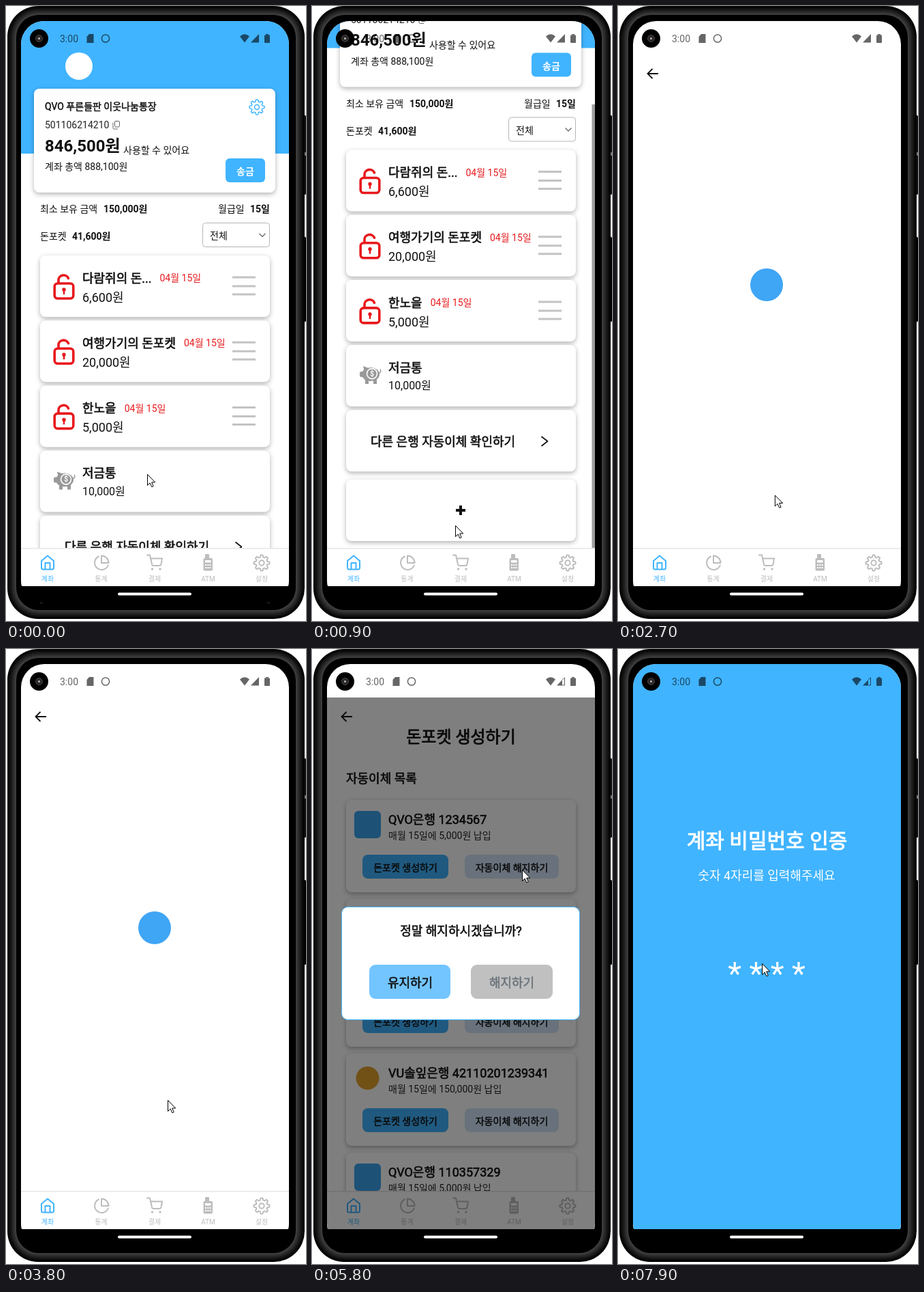
Animation, 440 px wide and 900 px high, one loop 8000 ms. Source, as an HTML page with a canvas:

```html
<!DOCTYPE html>
<html lang="ko">
<head>
<meta charset="utf-8">
<title>은행 앱</title>
<style>
html, body { margin: 0; width: 100%; height: 100%; overflow: hidden; background: #fff; }
canvas { display: block; width: 440px; height: 900px; }
</style>
</head>
<body>
<canvas id="stage" width="440" height="900"></canvas>
<script>
const c = document.getElementById('stage').getContext('2d');
const LOOP = 8000, STEP = 100;
const BLUE = '#40b4ff', INK = '#111', RED = '#e8191c', MUTE = '#bdbdbd';
const FONT = 'Roboto, "Noto Sans CJK KR", "Noto Sans CJK", sans-serif';
const BANK = 'QVO은행';

// keyframes: [time, value]; eased between neighbours
function track(t, keys) {
  if (t <= keys[0][0]) return keys[0][1];
  for (let i = 1; i < keys.length; i++) {
    const [t1, b] = keys[i], [t0, a] = keys[i - 1];
    if (t < t1) {
      const p = (t - t0) / (t1 - t0);
      return a + (b - a) * p * p * (3 - 2 * p);
    }
  }
  return keys[keys.length - 1][1];
}

// weight 500 is the regular face thickened by a thin outline
function text(s, x, y, size, color = INK, weight = 400, align = 'left') {
  const medium = weight === 500;
  c.font = `${medium ? 400 : weight} ${size}px ${FONT}`;
  c.textAlign = align;
  c.fillStyle = color;
  c.fillText(s, x, y + size * 0.37);
  if (medium) {
    c.strokeStyle = color;
    c.lineWidth = size * 0.034;
    c.lineJoin = 'round';
    c.strokeText(s, x, y + size * 0.37);
  }
  return c.measureText(s).width;
}

function box(x, y, w, h, r, fill, stroke, lw = 1) {
  c.beginPath();
  c.roundRect(x, y, w, h, r);
  if (fill) { c.fillStyle = fill; c.fill(); }
  if (stroke) { c.strokeStyle = stroke; c.lineWidth = lw; c.stroke(); }
}

function card(x, y, w, h, r = 8) {
  c.save();
  c.shadowColor = 'rgba(0,0,0,.3)';
  c.shadowBlur = 7;
  c.shadowOffsetY = 2.5;
  box(x, y, w, h, r, '#fff');
  c.restore();
}

function line(color, lw, ...pts) {
  c.beginPath();
  for (let i = 0; i < pts.length; i += 2) c.lineTo(pts[i], pts[i + 1]);
  c.strokeStyle = color;
  c.lineWidth = lw;
  c.stroke();
}

function poly(fill, ...pts) {
  c.beginPath();
  for (let i = 0; i < pts.length; i += 2) c.lineTo(pts[i], pts[i + 1]);
  c.closePath();
  c.fillStyle = fill;
  c.fill();
}

function disc(x, y, r, fill, stroke, lw = 1) {
  c.beginPath();
  c.arc(x, y, r, 0, 7);
  if (fill) { c.fillStyle = fill; c.fill(); }
  if (stroke) { c.strokeStyle = stroke; c.lineWidth = lw; c.stroke(); }
}

function path(d, color, lw, x, y) {
  c.save();
  c.translate(x, y);
  c.strokeStyle = color;
  c.lineWidth = lw;
  c.lineCap = c.lineJoin = 'round';
  c.stroke(new Path2D(d));
  c.restore();
}

function gear(x, y, r, color, lw) {
  c.beginPath();
  for (let i = 0; i < 96; i++) {
    const a = i / 96 * Math.PI * 2;
    const q = r + r * 0.13 * Math.tanh(3 * Math.cos(8 * a)) - r * 0.13;
    c.lineTo(x + q * Math.cos(a), y + q * Math.sin(a));
  }
  c.closePath();
  c.strokeStyle = color;
  c.lineWidth = lw;
  c.stroke();
  disc(x, y, r * 0.32, null, color, lw);
}

function lock(y) {
  path('M-8-6v-3.5a7.5 7 0 0 1 14.5-3', RED, 3.6, 85, y + 46);
  box(71.2, y + 41, 27.6, 22, 4.5, '#fff', RED, 3.6);
  disc(85, y + 50, 2.7, RED);
  c.fillRect(83.7, y + 50, 2.6, 7);
}

function piggy(y) {
  c.fillStyle = '#999';
  c.beginPath();
  c.ellipse(86, y + 43, 13, 10, 0, 0, 7);
  c.fill();
  c.fillRect(78, y + 48, 5, 9);
  c.fillRect(90, y + 48, 5, 9);
  box(70, y + 39, 8, 8, 2, '#999');
  poly('#999', 75, y + 31, 83, y + 34, 77, y + 40);
  path('M0 0q3-1 2-5', '#999', 1.5, 98.5, y + 41);
  disc(88, y + 42, 7.5, '#999', '#fff', 1.6);
  text('$', 88, y + 42, 10, '#fff', 700, 'center');
}

function pocket(y, name, sum, date) {
  card(50, y, 337, 90);
  const w = text(name, 112, y + 33, 18, INK, 500);
  if (!date) {
    piggy(y);
    text(sum, 112, y + 59, 16);
    return;
  }
  text(sum, 112, y + 61, 18);
  text(date, 124 + w, y + 33, 14, RED);
  lock(y);
  for (const k of [32, 45, 57]) line('#c3c3c3', 3, 332, y + k, 366, y + k);
}

function home(t) {
  const open = t >= 1200;
  const scroll = track(t, [[100, 0], [800, 154.5], [1800, 154.5], [2100, 193], [2300, 250]]);
  c.fillStyle = '#fff';
  c.fillRect(22, 22, 393, 827);
  c.save();
  c.translate(0, -scroll);
  c.fillStyle = BLUE;
  c.fillRect(22, 0, 393, 216);
  disc(107, 88, 20, '#fff');

  card(41, 121, 354, 152);
  text('QVO 푸른들판 이웃나눔통장', 57, 147, 14, INK, 500);
  gear(368, 148, 11, BLUE, 1.5);
  text('501106214210', 57, 174, 14, '#222');
  box(159.5, 168.5, 7, 8.5, 1.5, null, '#666');
  path('M0 0v7.5q0 1.5 1.5 1.5h5', '#666', 1, 157, 171);
  text('846,500원', 57, 204, 24, INK, 700);
  text('사용할 수 있어요', 172, 211, 14);
  text('계좌 총액 888,100원', 57, 235, 14);
  box(322, 223, 58, 35, 6, BLUE);
  text('송금', 351, 242, 14, '#fff', 700, 'center');

  text('최소 보유 금액', 50, 297, 14);
  text('150,000원', 143, 297, 14, INK, 700);
  text('월급일', 311, 297, 14);
  text('15일', 387, 297, 14, INK, 700, 'right');
  text('돈포켓', 50, 337, 14);
  text('41,600원', 97, 337, 14, INK, 700);
  box(288.5, 317.5, 98, 35, 4, '#fff', '#b5b5b5');
  text('전체', 299, 336, 14);
  line('#777', 1.6, 371.5, 333, 376, 337.5, 380.5, 333);

  const due = '04월 15일';
  [['다람쥐의 돈...', '6,600원', due], ['여행가기의 돈포켓', '20,000원', due],
   ['한노을', '5,000원', due], ['저금통', '10,000원']]
    .forEach((p, i) => pocket(365 + i * 95.2, ...p));

  card(50, 745.8, 337, 90);
  text('다른 은행 자동이체 확인하기', 86, 791.5, 18, INK, 500);
  line(INK, 1.7, 336.5, 784.5, 345.5, 791.5, 336.5, 798.5);
  if (open) {
    box(50, 850, 337, 90, 4, '#f4f4f4');
    text('목표 저축 추가하기', 218.5, 891, 18, '#b9b9b9', 500, 'center');
    card(50, 941, 337, 90);
    text('자동이체 등록하기', 218.5, 987, 18, INK, 500, 'center');
  } else {
    card(50, 847.5, 337, 90);
    line(INK, 4, 211, 892.5, 225, 892.5);
    line(INK, 4, 218, 885.5, 218, 899.5);
  }
  c.restore();

  if ((t >= 200 && t < 1600) || t >= 1800) {
    const [max, len] = open ? [437, 493] : [154.5, 650];
    c.fillStyle = 'rgba(0,0,0,.38)';
    c.fillRect(410.5, 22 + scroll / max * (772 - len), 4.5, len);
  }
}

function transfer(y, h, name, sum, mark) {
  card(50, y, 337, h);
  if (mark) disc(81.5, y + 36, 17, mark);
  else box(62, y + 16, 39, 40, 6, '#3ba4ee');
  text(name, 112, y + 28, 18, INK, 500);
  text(`매월 15일에 ${sum}원 납입`, 112, y + 52, 14, '#222');
  const b = y + h - 55;
  box(74, b, 126, 35, 8, BLUE);
  text('돈포켓 생성하기', 137, b + 19, 14, INK, 500, 'center');
  box(224, b, 138, 35, 8, '#d3e6fa');
  text('자동이체 해지하기', 293, b + 19, 14, INK, 500, 'center');
}

function list(t) {
  c.fillStyle = '#fff';
  c.fillRect(22, 22, 393, 827);
  line(INK, 1.8, 59, 99, 43.5, 99);
  line(INK, 1.8, 50.5, 92, 43.5, 99, 50.5, 106);
  if (t < 4100) {
    disc(218, 408, 24, '#3fa5f5');
    return;
  }
  text('돈포켓 생성하기', 218.5, 128, 24, INK, 500, 'center');
  text('자동이체 목록', 50, 189, 18, INK, 500);
  transfer(221, 135, BANK + ' 1234567', '5,000');
  transfer(366, 216, BANK + ' 1103573', '5,000');
  transfer(592, 135, 'VU솔잎은행 42110201239341', '150,000', '#e5a32c');
  transfer(737, 135, BANK + ' 110357329', '5,000');
}

function password(t) {
  c.fillStyle = BLUE;
  c.fillRect(22, 22, 393, 827);
  text('계좌 비밀번호 인증', 218.5, 280, 30, '#fff', 500, 'center');
  text('숫자 4자리를 입력해주세요', 218, 331, 18, '#fff', 400, 'center');
  const n = Math.max(0, Math.min(4, Math.floor((t - 7300) / 100)));
  if (n) text(Array(n).fill('*').join(' '), 218, 474, 46, '#fff', 400, 'center');
}

function modal(t) {
  c.globalAlpha = Math.min(1, (t - 5200) / 300);
  c.fillStyle = 'rgba(0,0,0,.5)';
  c.fillRect(22, 71, 393, 778);
  box(43.5, 377.5, 349, 165, 9, '#fff', BLUE);
  text('정말 해지하시겠습니까?', 218.5, 412, 18, INK, 500, 'center');
  box(84, 462, 119, 50, 9, '#73c5ff');
  text('유지하기', 144, 488, 18, INK, 500, 'center');
  box(233, 462, 120, 50, 9, t >= 6400 ? '#c8c8c8' : '#c0c0c0');
  text('해지하기', 293, 488, 18, '#6c757d', 500, 'center');
  c.globalAlpha = 1;
}

function tabs() {
  c.fillStyle = '#fff';
  c.fillRect(22, 794, 393, 55);
  c.fillStyle = '#e6e6e6';
  c.fillRect(22, 793, 393, 1.5);
  ['계좌', '통계', '결제', 'ATM', '설정'].forEach((s, i) =>
    text(s, 61 + i * 78.5, 838, 10, i ? MUTE : BLUE, 400, 'center'));
  path('M-9-3L0-10.5L9-3V7q0 2.5-2.5 2.5h-13Q-9 9.5-9 7ZM-3.5 9.5V0h7v9.5', BLUE, 2, 61, 815);
  path('M9.8 3.5A10.2 10.2 0 1 1-4-9.5M0-10.5A10.5 10.5 0 0 1 10.5 0H0Z', MUTE, 2, 140, 815);
  path('M-11-10.5h4L-4 3q.5 2 2.5 2H7q2 0 2.5-2L11-5.5H-6', MUTE, 2, 218, 814);
  disc(214.5, 824, 1.7, MUTE);
  disc(226, 824, 1.7, MUTE);
  box(289.5, 808, 13.5, 18.5, 2, MUTE);
  box(292, 802, 6, 8, 1, MUTE);
  c.fillStyle = '#fff';
  c.fillRect(292, 811, 8.5, 3.5);
  for (let i = 0; i < 6; i++) c.fillRect(292 + i % 3 * 3.3, 817 + (i / 3 | 0) * 4, 2, 2);
  gear(375, 815, 11.5, MUTE, 2);
}

function status(t) {
  const ink = 'rgba(0,0,0,.6)';
  text('3:00', 79, 48, 14, ink);
  poly(ink, 122, 41, 128.5, 41, 128.5, 54, 118.5, 54, 118.5, 45);
  disc(146, 47.5, 5.6, null, ink, 1.5);
  c.beginPath();
  c.moveTo(350, 53.5);
  c.lineTo(343, 44.5);
  c.quadraticCurveTo(350, 38, 357, 44.5);
  c.fillStyle = ink;
  c.fill();
  if (t < 5000) poly(ink, 371, 41, 371, 53.5, 359, 53.5);
  else {
    poly(ink, 367, 45.2, 367, 53.5, 359, 53.5);
    line(ink, 1, 367, 45.2, 370.5, 42, 370.5, 53, 367, 53);
  }
  box(379, 42.5, 8, 11.5, 1, ink);
  c.fillRect(381, 41, 4, 1.5);
}

function phone() {
  c.fillStyle = '#fff';
  c.fillRect(0, 0, 440, 900);
  box(434, 160, 6, 116, 1.5, '#111');
  c.fillStyle = '#777';
  c.fillRect(438, 214, 2, 5);
  box(434, 338, 6, 124, 1.5, '#000');
  box(2, 0, 436, 897, 45, '#050505');
  // metal rim, dark outside to lighter inside
  for (let i = 0; i < 5; i++) {
    const d = 3 + i * 2, g = 16 + i * 11;
    box(2 + d, d, 436 - 2 * d, 897 - 2 * d, 45 - d, `rgb(${g},${g},${g})`);
  }
  box(15, 13, 410, 871, 33, '#000');
}

function cursor(t) {
  const x = track(t, [[100, 207], [900, 210], [1100, 216], [1800, 216], [2100, 218], [2500, 229],
    [3500, 237], [4300, 237], [5000, 308], [5800, 308], [6400, 267], [7000, 267], [7400, 211]]);
  const y = track(t, [[100, 685], [700, 750], [900, 760], [1100, 741], [1800, 741], [2100, 714], [2500, 722],
    [3500, 660], [4300, 660], [5000, 323], [5800, 323], [6400, 495], [7000, 495], [7400, 460]]);
  c.save();
  c.translate(x, y);
  const p = new Path2D('M.5.5V16.5L4.2 13L6.8 18.8L9.2 17.7L6.7 12H11.7Z');
  c.fillStyle = '#fff';
  c.fill(p);
  c.strokeStyle = '#000';
  c.lineWidth = 1;
  c.stroke(p);
  c.restore();
}

// draws a page shifted right while it slides in
function slide(t, start, end, page) {
  const p = Math.min(1, (t - start) / (end - start));
  c.save();
  c.translate(393 * Math.pow(1 - p, 2.85), 0);
  page(t);
  c.restore();
}

function draw(t) {
  phone();
  c.save();
  c.beginPath();
  c.roundRect(22, 22, 393, 852, 34);
  c.clip();
  if (t < 2700) home(t);
  if (t >= 2400) slide(t, 2400, 2700, list);
  tabs();
  if (t >= 6500) slide(t, 6500, 7000, password);
  if (t >= 5300 && t < 7100) modal(t);
  c.fillStyle = '#000';
  c.fillRect(22, 849, 393, 30);
  box(164, 858.5, 108, 4, 2, '#fff');
  status(t);
  c.restore();
  disc(48.5, 47.5, 13.5, '#000');
  disc(48.5, 47.5, 5, '#2b2727', '#4a4444');
  disc(48.5, 47.5, 1.5, '#bbb');
  cursor(t);
}

function frame(now) {
  draw(Math.floor(now % LOOP / STEP) * STEP);
  requestAnimationFrame(frame);
}
requestAnimationFrame(frame);
</script>
</body>
</html>
```
